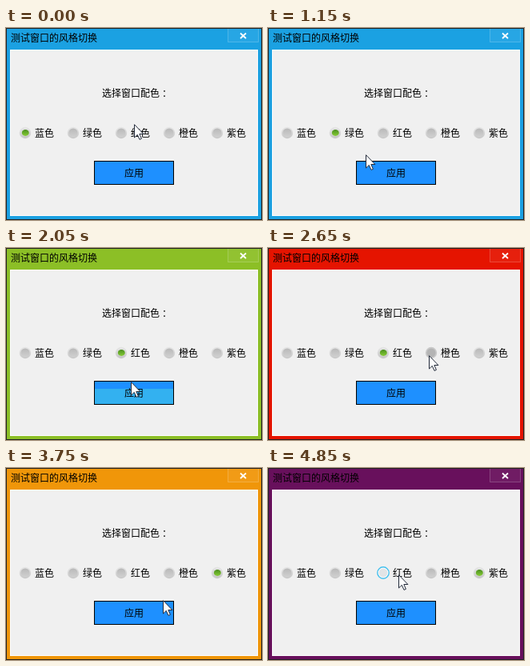
An HTML page that plays this animation: 320 by 240 pixels, repeating every 4900 ms.

```html
<!DOCTYPE html>
<html lang="zh-CN">
<head>
<meta charset="utf-8">
<title>窗口风格切换</title>
<style>
  html, body { margin: 0; width: 100%; height: 100%; overflow: hidden; }
  svg { display: block; width: 100%; height: 100%; }
  text { font: 12px "Noto Sans CJK SC", "Noto Sans CJK", sans-serif; fill: #000; }
  .ring { fill: url(#rim); }
  .disc { fill: url(#grey); }
  .dot { fill: url(#green); visibility: hidden; }
  .checked .dot { visibility: visible; }
  .checked .disc { fill: url(#rim); }
  .hover .ring { fill: #fff; stroke: #45bfec; stroke-width: 1.4; }
  .hover:not(.checked) .disc { fill: #e2e4e6; }
  .pressed .ring { fill: #c8c8c8; }
  .pressed .disc { fill: #b4b4b4; }
</style>
</head>
<body>
<svg viewBox="0 0 320 240">
  <defs>
    <linearGradient id="rim" x2="0" y2="1">
      <stop stop-color="#e6e6e6"/><stop offset="1" stop-color="#c6c6c6"/>
    </linearGradient>
    <linearGradient id="grey" x2="0" y2="1">
      <stop stop-color="#b9b9b9"/><stop offset="1" stop-color="#d0d0d0"/>
    </linearGradient>
    <linearGradient id="green" x2="0" y2="1">
      <stop stop-color="#4b8f1f"/><stop offset="1" stop-color="#86cc35"/>
    </linearGradient>
  </defs>

  <rect id="base" width="320" height="240"/>
  <rect id="wipe" x="1" width="318"/>
  <rect x=".5" y=".5" width="319" height="239" fill="none" stroke="#222"/>
  <rect x="5.5" y="27.5" width="309" height="207" fill="#f0f0f0" stroke="#fdfdfd"/>
  <path d="M277.5 1V17.5H315.5V1" fill="#fff" fill-opacity=".05" stroke="#fff" stroke-opacity=".2"/>
  <path d="M293 6.5l7 6.5M300 6.5l-7 6.5" stroke="#fff" stroke-width="1.8"/>
  <text x="6" y="17">测试窗口的风格切换</text>
  <text x="120" y="86">选择窗口配色<tspan dx="3">：</tspan></text>
  <g id="radios"></g>

  <rect x="110" y="166" width="100" height="30" fill="#1e90ff"/>
  <rect id="light" x="110" width="100" fill="#33b1f0"/>
  <rect x="110.5" y="166.5" width="99" height="29" fill="none" stroke="#000"/>
  <text x="148" y="186">应用</text>

  <path id="cursor" d="M.5 .7V17L4.3 13.4L7 19.4L9.4 18.3L6.8 12.5H11.9Z"
        fill="#fff" stroke="#222a3a"/>
</svg>
<script>
const LOOP = 4900, TICK = 50, TRAVEL = 200;
const RADIO_Y = 134, BUTTON_Y = 179;
const $ = id => document.getElementById(id);
const clamp = v => Math.min(1, Math.max(0, v));

const options = [
  ["蓝色", "#1ba1e2"], ["绿色", "#8cbf26"], ["红色", "#e51400"],
  ["橙色", "#f09609"], ["紫色", "#68105c"]
];

// Each round picks the next option, then applies it with the button
const rounds = [
  { select: 1042, apply: 1300, radioX: 86, buttonX: 153 },
  { select: 1904, apply: 2200, radioX: 150, buttonX: 158 },
  { select: 2700, apply: 3000, radioX: 201, buttonX: 189 },
  { select: 3612, apply: 4050, radioX: 264, buttonX: 166 }
];

const home = [160, 120];
const moves = [];
const moveTo = (depart, x, y) => moves.push({ depart, x, y });
const [first] = rounds;
moveTo(50, first.radioX, RADIO_Y);
moveTo(300, first.buttonX, BUTTON_Y);
moveTo(600, first.radioX, RADIO_Y);
rounds.forEach(({ select, apply, buttonX }, i) => {
  moveTo(select, buttonX, BUTTON_Y);
  const next = rounds[i + 1];
  moveTo(apply + TRAVEL, next ? next.radioX : 179, next ? RADIO_Y : 112);
});
moveTo(4650, 163, 133);

$("radios").innerHTML = options.map(([label], i) => `
  <g transform="translate(${60 * i} 0)">
    <circle class="ring" cx="24" cy="131" r="7.2"/>
    <circle class="disc" cx="24" cy="131" r="5.5"/>
    <ellipse class="dot" cx="24.3" cy="131" rx="4.5" ry="3.9"/>
    <text x="36" y="136">${label}</text>
  </g>`).join("");
const radios = [...$("radios").children];

function pointer(t) {
  let [x, y] = home;
  for (const move of moves) {
    const k = clamp((t - move.depart) / TRAVEL);
    x += (move.x - x) * k;
    y += (move.y - y) * k;
  }
  return [Math.round(x), Math.round(y)];
}

function overButton(t) {
  const [x, y] = pointer(t);
  return x >= 110 && x < 210 && y >= 166 && y < 196;
}

// Fill from the bottom edge up to a share of the height
function fillUp(rect, top, bottom, share) {
  const height = Math.floor((bottom - top) * share + 1e-6);
  rect.setAttribute("y", bottom - height);
  rect.setAttribute("height", height);
}

function draw(t) {
  const theme = rounds.filter(r => r.apply <= t).length;
  const applied = theme ? rounds[theme - 1].apply : -LOOP;
  $("base").setAttribute("fill", options[Math.max(0, theme - 1)][1]);
  $("wipe").setAttribute("fill", options[theme][1]);
  fillUp($("wipe"), 1, 240, clamp((t - applied + TICK) / 250));
  fillUp($("light"), 166, 196, (2 * overButton(t) + overButton(t - TICK)) / 3);

  const [x, y] = pointer(t);
  const selected = rounds.filter(r => r.select <= t).length;
  radios.forEach((radio, i) => {
    const left = 17 + 60 * i;
    const over = x >= left && x < left + 44 && y >= 124 && y < 139;
    const wait = i ? rounds[i - 1].select - t : 0;
    const pressed = wait > 0 && wait <= TICK;
    radio.classList.toggle("checked", i === selected);
    radio.classList.toggle("hover", over && !pressed);
    radio.classList.toggle("pressed", pressed);
  });
  $("cursor").setAttribute("transform", `translate(${x} ${y})`);
}

const start = performance.now();
function frame() {
  const t = (performance.now() - start) % LOOP;
  draw(Math.floor(t / TICK) * TICK);
  requestAnimationFrame(frame);
}
frame();
</script>
</body>
</html>
```
